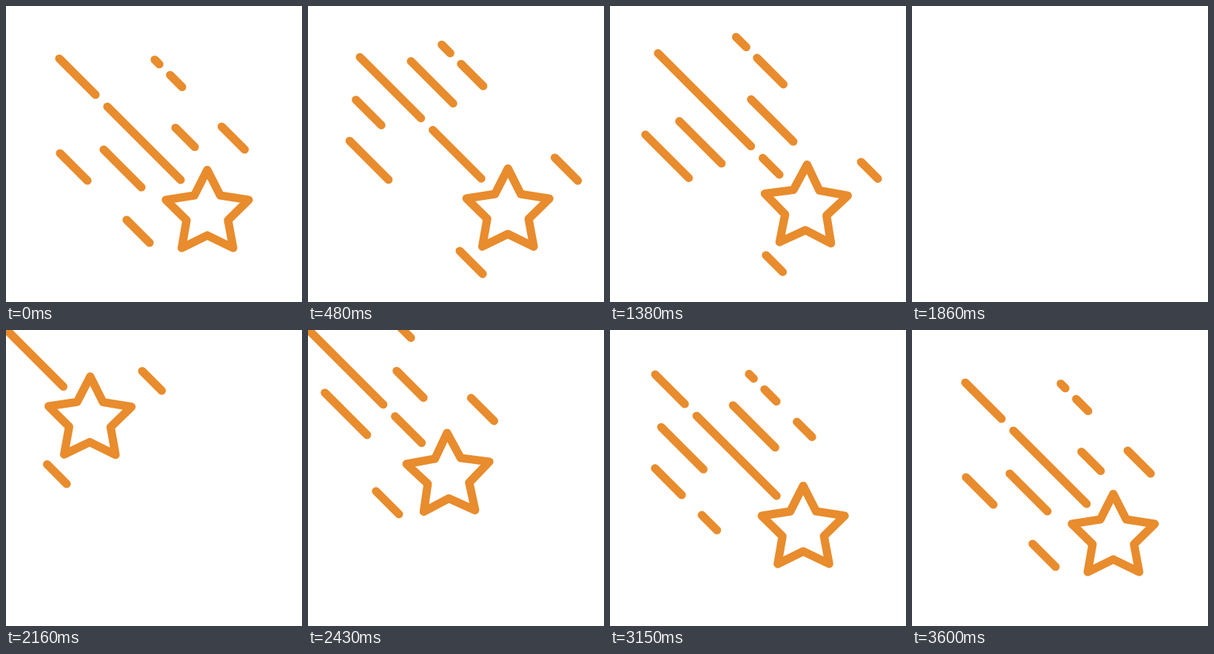
Write an HTML page that moves like this. It is 400x400 px and loops after 3630 ms.

```html
<!DOCTYPE html>
<html lang="en">
<head>
<meta charset="utf-8">
<title>Shooting star</title>
<style>
  html, body { margin: 0; width: 100%; height: 100%; overflow: hidden; background: #fff; }
  svg { display: block; width: 100vw; height: 100vh; }
  path { fill: none; stroke: #e88c2d; stroke-width: 11.2; stroke-linecap: round; stroke-linejoin: round; }
</style>
</head>
<body>
<svg viewBox="0 0 400 400">
  <path id="trails"/>
  <path id="star" d="M272 221.5L289.5 256L328 262L300 289.5L307 327L272 310L237.5 327L244 289.5L216 262L254.5 256Z"/>
</svg>
<script>
const LOOP = 3630, REST = 3600, STEP = 30;
const LEAVE = 420, GONE = 1760, RETURN = 1875;

const trails = document.getElementById('trails');
const star = document.getElementById('star');

// Speeds up over the share `ramp`, cruises, then slows down over the same share.
function cruise(u, ramp) {
  const speed = 1 / (1 - ramp);
  const ease = x => speed * x * x / (2 * ramp);
  if (u >= 1) return 1;
  if (u < ramp) return ease(u);
  return u > 1 - ramp ? 1 - ease(1 - u) : speed * (u - ramp / 2);
}

// Diagonal shift of the star, how far the trails lag behind it, and its tilt.
function pose(t) {
  if (t < RETURN) {
    const u = Math.max(0, (t - LEAVE) / (GONE - LEAVE));
    const sway = Math.sin(Math.PI * u);
    return { shift: 345 * u ** 14 - 13.3 * sway, lag: 4.5 * sway, tilt: 2 * u };
  }
  const decay = ms => Math.exp(-ms / 435);
  const shift = -328 * Math.max(0, decay(t - 1860) - decay(REST - 1860));
  const left = Math.max(0, (REST - t) / 1170);
  return { shift, lag: 0.2 * shift, tilt: -1.6 * left * Math.cos((t - 2430) / 150) };
}

const line = (lane, a, b) => b > a
  ? `M${a.toFixed(2)} ${(a + lane).toFixed(2)}L${b.toFixed(2)} ${(b + lane).toFixed(2)}` : '';

// Repeating dashes cut to the stretch lo..hi of a lane.
function dashes(lane, start, length, period, lo, hi) {
  let out = '';
  let x = start - Math.ceil((start + length - lo) / period) * period;
  for (; x < hi; x += period) out += line(lane, Math.max(x, lo), Math.min(x + length, hi));
  return out;
}

function draw(t) {
  const { shift: s, lag, tilt } = pose(t);
  const l = s + lag;
  const flow = cruise(t / REST, 0.23);

  // Each dash pattern runs a whole number of periods per loop.
  const long = 137 + 4 * 200 * cruise(t / 3400, 0.39) + s;
  const mid = 132 + 8 * 147 * flow + s;
  const side = 163 + 7 * 125 * flow + s;

  // The outer lines stretch backwards, then draw in again.
  const stretch = Math.sqrt(Math.max(0, Math.sin(Math.PI * t / 2900)));
  const low = 73 - 22 * stretch + (s / 11) ** 2 + l;
  const high = 201 - 27 * stretch + l;
  const gap = 214.5 - 19.5 * stretch + l;

  trails.setAttribute('d',
    dashes(-1, long, 184, 200, 72 + s, 236 + s) +
    dashes(62, mid, 57, 147, 66 + l, 183 + l) +
    dashes(-64.5, mid + 97, 57, 147, 139 + l, 255 + l) +
    dashes(126, side, 31, 125, 135 + s, 240.5 + s) +
    dashes(-128.5, side + 128.5, 31, 125, 263.5 + s, 369 + s) +
    line(126, low, 110 + l) +
    line(-128.5, high, gap - 7.3) +
    line(-128.5, gap + 7.3, 238 + l));
  star.setAttribute('transform', `translate(${s} ${s}) rotate(${tilt} 272 278)`);
}

const began = performance.now();
function tick() {
  const t = (performance.now() - began) % LOOP;
  draw(Math.floor(t / STEP) * STEP);
  requestAnimationFrame(tick);
}
tick();
</script>
</body>
</html>
```
